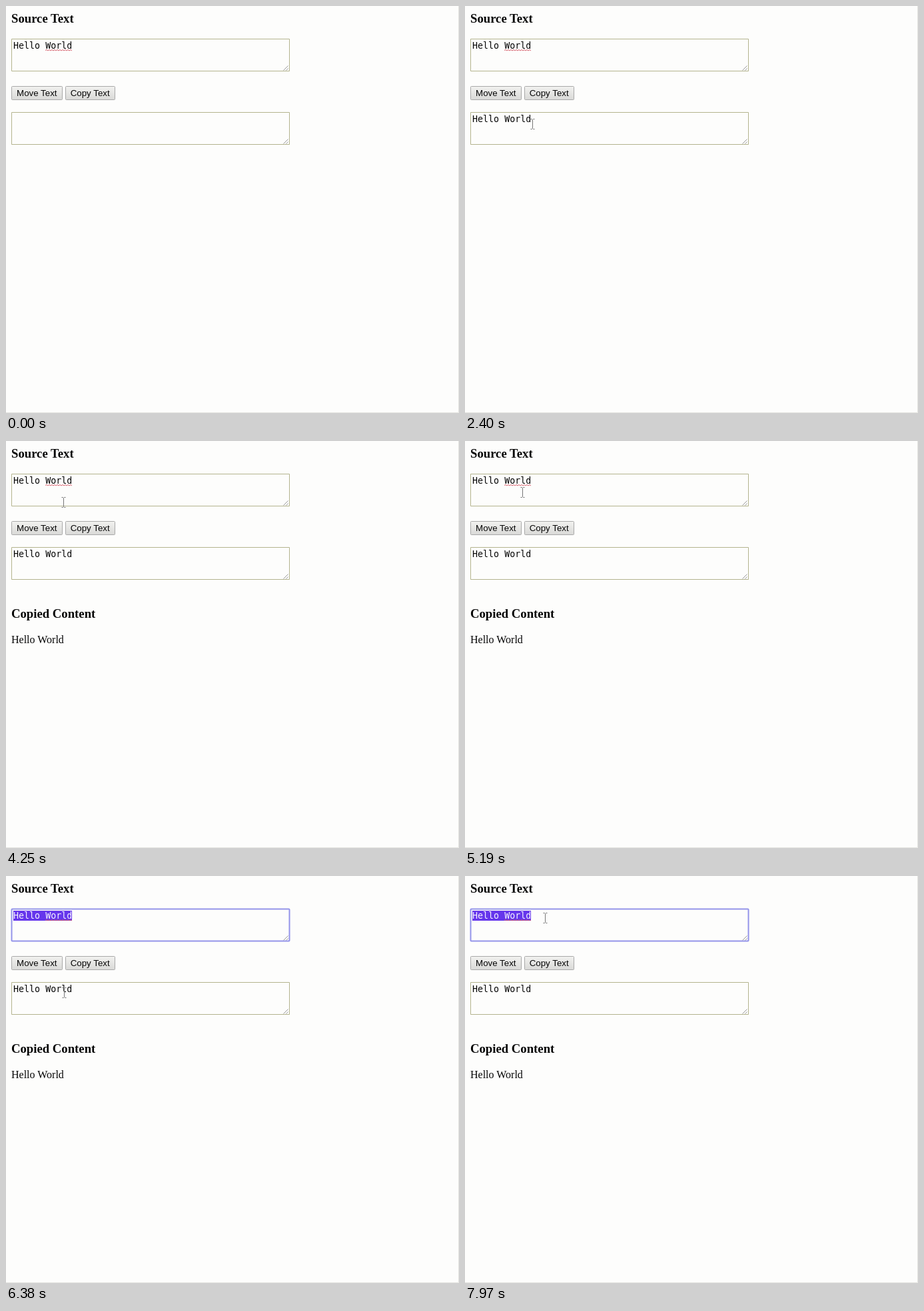
These frames come from a looping animation (680 by 610 pixels, 8000 ms). An HTML page:

```html
<!DOCTYPE html>
<html lang="en">
<head>
<meta charset="utf-8">
<title>Move and copy text</title>
<style>
html, body { margin: 0; width: 100%; height: 100%; overflow: hidden; background: #fdfdfc; }
svg { display: block; width: 680px; height: 610px; }
text { fill: #060606; white-space: pre; }
.head { font: bold 18.72px "Liberation Serif", serif; }
.body { font: 16px "Liberation Serif", serif; }
.mono { font: 13.333px "DejaVu Sans Mono", monospace; }
.label { font: 13.333px "Liberation Sans", sans-serif; text-anchor: middle; }
.line { fill: none; stroke: #b4b48e; }
.grip { fill: none; stroke: #999; }
.button rect { fill: url(#normal); stroke: #a9a9a9; }
.button.hover rect { fill: url(#hover); stroke: #959595; }
.button.pressed rect { fill: url(#pressed); stroke: #959595; }
</style>
</head>
<body>
<svg viewBox="0 0 680 610">
  <defs>
    <linearGradient id="normal" x2="0" y2="1"><stop stop-color="#f2f2f0"/><stop offset="1" stop-color="#d9d9d7"/></linearGradient>
    <linearGradient id="hover" x2="0" y2="1"><stop stop-color="#f6f6f4"/><stop offset="1" stop-color="#dededc"/></linearGradient>
    <linearGradient id="pressed" x2="0" y2="1"><stop stop-color="#d9d9d7"/><stop offset="1" stop-color="#eeeeec"/></linearGradient>
    <g id="area">
      <path class="line" d="M.5 .5H417.5V48.5H.5Z"/>
      <path class="grip" d="M408.5 47.5l7-7M412.5 47.5l3-3"/>
    </g>
  </defs>
  <path d="M679.5 0V609.5H0" fill="none" stroke="#e4e4e0"/>

  <text class="head" x="8" y="25">Source Text</text>
  <use href="#area" x="8" y="49"/>
  <rect id="ring" x="8.5" y="49.5" width="417" height="48" rx="1" fill="none" stroke="#9494ea" stroke-width="2"/>
  <rect id="selection" x="11" y="52" width="88" height="15" fill="#6636ec"/>
  <text id="source" class="mono" x="11" y="64">Hello World</text>
  <path id="squiggle" fill="none" stroke="#d8606c"/>

  <g id="move" class="button"><rect x="8.5" y="120.5" width="76" height="20" rx="1"/><text class="label" x="46.3" y="135">Move Text</text></g>
  <g id="copy" class="button"><rect x="89.5" y="120.5" width="74" height="20" rx="1"/><text class="label" x="126.2" y="135">Copy Text</text></g>

  <use href="#area" x="8" y="159"/>
  <text id="moved" class="mono" x="11" y="174">Hello World</text>

  <g id="copied">
    <text class="head" x="8" y="265">Copied Content</text>
    <text class="body" x="8" y="303">Hello World</text>
  </g>

  <g id="cursor">
    <path id="arrow" d="M.5 .5V13l3-2.7 2 5 2.3-1-2.1-4.8H9.5Z" fill="#060606" stroke="#fff" stroke-width=".8"/>
    <path id="beam" d="M-3 -7.5H-1L0 -6.5L1 -7.5H3M0 -6.5V6.5M-3 7.5H-1L0 6.5L1 7.5H3" fill="none" stroke="#777"/>
  </g>
</svg>
<script>
const LOOP = 8000;
const MOVED = 950, COPIED = 3010, FOCUSED = 5570, SELECTED = 5640;

// Pointer path: time, x, y
const path = [
  [140, 118, 186], [600, 69, 130], [1330, 69, 130], [1600, 102, 177],
  [2400, 102, 177], [2800, 125, 130], [3300, 125, 130], [3720, 88, 275],
  [3810, 88, 275], [3940, 88, 240], [4120, 88, 228], [4250, 87, 92],
  [4560, 87, 77], [6050, 87, 77], [6380, 88, 175], [6750, 90, 225],
  [7140, 90, 225], [7920, 121, 63], [LOOP, 121, 63]
];

const get = id => document.getElementById(id);
const show = (id, on) => get(id).style.display = on ? "" : "none";
const inside = ([x, y], left, top, right, bottom) =>
  x >= left && x <= right && y >= top && y <= bottom;

let wave = "M59 66.5";
for (let x = 61; x <= 99; x += 2) wave += `L${x} ${x % 4 === 1 ? 65.5 : 67}`;
get("squiggle").setAttribute("d", wave);

function pointerAt(t) {
  if (t < path[0][0]) return path[0].slice(1);
  const next = path.findIndex(p => p[0] > t);
  const [t0, x0, y0] = path[next - 1], [t1, x1, y1] = path[next];
  const k = (t - t0) / (t1 - t0);
  return [Math.round(x0 + (x1 - x0) * k), Math.round(y0 + (y1 - y0) * k)];
}

function setButton(id, hovered, pressed) {
  get(id).setAttribute("class", "button" + (pressed ? " pressed" : hovered ? " hover" : ""));
}

function draw(t) {
  const point = pointerAt(t);
  const overText = inside(point, 8, 49, 426, 98) || inside(point, 8, 159, 426, 208);
  show("cursor", t >= path[0][0]);
  show("arrow", !overText);
  show("beam", overText);
  get("cursor").setAttribute("transform", `translate(${point[0] - (overText ? .5 : 0)} ${point[1]})`);

  setButton("move", inside(point, 8, 120, 85, 141), t >= 920 && t < MOVED);
  setButton("copy", inside(point, 89, 120, 164, 141), t >= 2940 && t < COPIED);

  show("moved", t >= MOVED);
  show("copied", t >= COPIED);
  show("ring", t >= FOCUSED);
  show("selection", t >= SELECTED);
  get("source").style.fill = t >= SELECTED ? "#f4f2ff" : "";
}

const start = performance.now();
function frame() {
  draw((performance.now() - start) % LOOP);
  requestAnimationFrame(frame);
}
draw(0);
requestAnimationFrame(frame);
</script>
</body>
</html>
```
